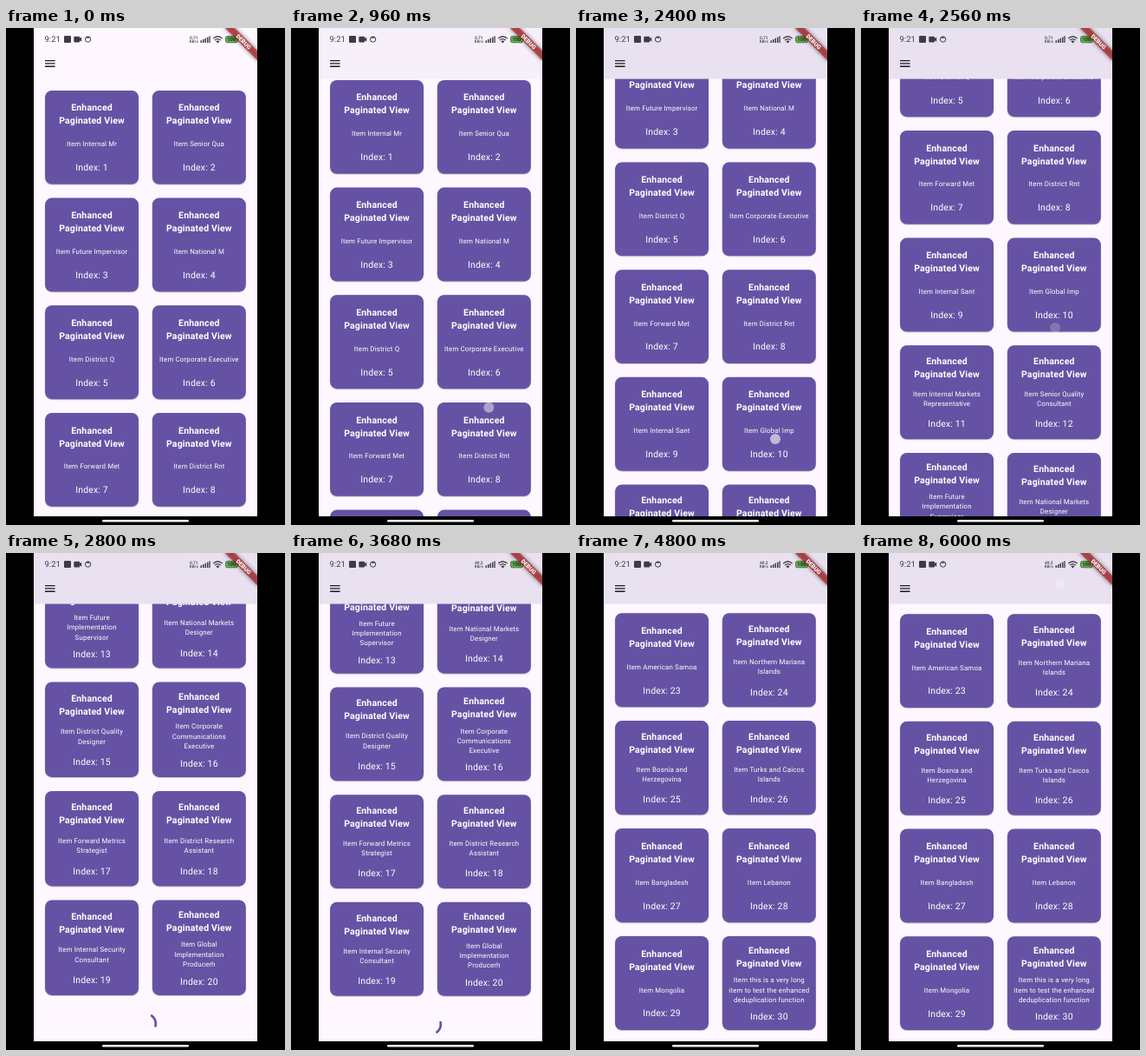
These frames come from a looping animation (322 px wide and 572 px high, 6240 ms). An HTML page:

```html
<!DOCTYPE html>
<html lang="en">
<head>
<meta charset="utf-8">
<title>Paginated list</title>
<style>
html, body { margin: 0; width: 100%; height: 100%; overflow: hidden; background: #000; }
svg { display: block; width: 100vw; height: 100vh; font-family: Roboto, sans-serif; }
.card text { fill: #fff; text-anchor: middle; letter-spacing: .164px; }
.big { font-size: 10.5px; }
.small { font-size: 7.87px; }
.bold { font-weight: 700; }
</style>
</head>
<body>
<svg viewBox="0 0 322 572" text-rendering="geometricPrecision">
  <defs>
    <clipPath id="screen"><rect x="32" width="258" height="562"/></clipPath>
    <filter id="soft" x="-20%" y="-150%" width="140%" height="400%"><feGaussianBlur stdDeviation="2.4"/></filter>
  </defs>
  <rect width="322" height="572"/>
  <g clip-path="url(#screen)">
    <rect x="32" width="258" height="562" fill="#fef7ff"/>
    <g id="list"><path id="spinner" fill="none" stroke="#6750a4" stroke-width="2.63" stroke-linecap="square"/></g>
    <rect id="bar" x="32" width="258" height="58.6"/>
    <g fill="#1d1b20"><path d="M45 37h11.6v1.3h-11.6zM45 40.3h11.6v1.3h-11.6zM45 43.6h11.6v1.3h-11.6z"/></g>
    <g fill="#3f3b44">
      <text x="44.5" y="16.3" font-size="9.4" letter-spacing=".1">9:21</text>
      <rect x="67" y="9" width="8" height="8" rx="1"/>
      <path d="M79.3 9.8h4.8q1 0 1 1v1.2l2.1-1.5v5.2l-2.1-1.5v1.2q0 1-1 1h-4.8q-1 0-1-1v-4.6q0-1 1-1z"/>
      <circle cx="94.6" cy="13" r="3.2" fill="none" stroke="#3f3b44"/>
      <path d="M92.8 10.2h3.6v1.5h-3.6z"/>
      <g font-size="4.9" font-weight="500" text-anchor="middle">
        <text id="speed" x="216.8" y="12.6"></text>
        <text x="216.8" y="17.4" font-size="4.6">KB/s</text>
      </g>
      <path d="M224.5 14.2h1.5v2.8h-1.5zM227 13h1.5v4h-1.5zM229.5 11.7h1.5v5.3h-1.5zM232 10.4h1.5v6.6h-1.5zM234.4 9.2h1.3v7.8h-1.3z"/>
      <g fill="none" stroke="#3f3b44" stroke-width="1.3">
        <path d="M239.2 12.1q5.2-4.8 10.4 0M241 14.1q3.4-3 6.8 0"/>
      </g>
      <path d="M242.3 15.3q2.1-1.7 4.2 0l-2.1 2.2z"/>
    </g>
    <rect x="253.5" y="9.4" width="14" height="7.4" rx="2" fill="#58b947" stroke="#4b514a" stroke-width=".8"/>
    <rect x="268.1" y="11.6" width="1.2" height="3" fill="#4b514a"/>
    <text x="260.3" y="15.3" font-size="6" font-weight="700" text-anchor="middle" fill="#243323">100</text>
    <g transform="translate(290 0) rotate(45)">
      <rect x="-27" y="18.4" width="54" height="7.9" opacity=".5" filter="url(#soft)"/>
      <rect x="-27" y="18.4" width="54" height="7.9" fill="#b71c1c" opacity=".63"/>
      <text y="24.7" font-size="6.7" font-weight="900" text-anchor="middle" fill="#fff">DEBUG</text>
    </g>
    <circle id="touch" r="6" fill="#fff"/>
  </g>
  <rect x="111" y="566" width="100" height="2.4" rx="1.2" fill="#f4f4f4"/>
</svg>
<script>
const LOOP = 6240, STEP = 80, LAST = 6000;
const TOP = 71.9, PITCH = 123.68, CARD = 107.9, BOTTOM = 562;
const PAGE = 164.8, PAGE2 = PAGE + 5 * PITCH, END = 1362.2;
const NS = 'http://www.w3.org/2000/svg';
const $ = id => document.getElementById(id);
const list = $('list'), spinner = $('spinner'), bar = $('bar'), touch = $('touch'), speed = $('speed');

const names = [
  'Internal Mr', 'Senior Qua', 'Future Impervisor', 'National M', 'District Q',
  'Corporate Executive', 'Forward Met', 'District Rnt', 'Internal Sant', 'Global Imp',
  'Internal Markets|Representative', 'Senior Quality|Consultant',
  'Future|Implementation|Supervisor', 'National Markets|Designer',
  'District Quality|Designer', 'Corporate|Communications|Executive',
  'Forward Metrics|Strategist', 'District Research|Assistant',
  'Internal Security|Consultant', 'Global|Implementation|Producerh',
  'Virgin Islands, U.S.', 'French Southern|Territories', 'American Samoa',
  'Northern Mariana|Islands', 'Bosnia and|Herzegovina', 'Turks and Caicos|Islands',
  'Bangladesh', 'Lebanon', 'Mongolia',
  'this is a very long|item to test the enhanced|deduplication function'
];

function add(parent, tag, attrs, text) {
  const el = document.createElementNS(NS, tag);
  for (const k in attrs) el.setAttribute(k, attrs[k]);
  if (text) el.textContent = text;
  return parent.appendChild(el);
}

// Three blocks (title, name, index) share the free height evenly.
function makeCard(name, i) {
  const x = i % 2 ? 168.9 : 45.1, y = TOP + PITCH * (i >> 1);
  const g = add(list, 'g', { class: 'card', transform: `translate(${x} ${y})` });
  add(g, 'rect', { x: -.3, y: .3, width: CARD + .6, height: CARD + .7, rx: 8.2, opacity: .2 });
  add(g, 'rect', { width: CARD, height: CARD, rx: 7.9, fill: '#6652a4' });
  const lines = ('Item ' + name).split('|');
  const gap = (CARD - 10.5 - 45 - 11.25 * lines.length) / 3;
  let top = 5.25 + gap / 2;
  const put = (text, cls, base, height) => {
    add(g, 'text', { x: CARD / 2, y: top + base, class: cls }, text);
    top += height;
  };
  put('Enhanced', 'big bold', 11.5, 15);
  put('Paginated View', 'big bold', 11.5, 15);
  top += gap;
  lines.forEach(line => put(line, 'small', 8.6, 11.25));
  top += gap;
  put('Index: ' + (i + 1), 'big', 11.5, 15);
  return g;
}
const cards = names.map(makeCard);

// Linear track through [time, value] points.
function track(points, t) {
  if (t <= points[0][0]) return points[0][1];
  for (let i = 1; i < points.length; i++) {
    const [a, u] = points[i - 1], [b, v] = points[i];
    if (t <= b) return u + (v - u) * (t - a) / (b - a);
  }
  return points[points.length - 1][1];
}

const scrollTrack = [
  [880, 0], [960, 12], [1040, 62], [1120, 128], [1200, PAGE],
  [2400, PAGE], [2480, 195], [2560, 325], [2640, 510], [2720, 710], [2800, PAGE2],
  [4240, PAGE2], [4320, 913], [4400, 1141.5], [4480, 1303], [4560, END]
];
const stretchTrack = [
  [1120, 0], [1200, .006], [1280, .008], [1360, .0017], [1520, 0],
  [2720, 0], [2800, .0147], [2880, .007], [2960, .002], [3040, 0],
  [4480, 0], [4560, .012], [4640, .01], [4720, .005], [4800, .002], [4960, 0]
];
// start, end, from x y, to x y, opacity from, to
const touches = [
  [880, 1120, 230, 480, 225, 350, .6, .2],
  [2400, 2560, 230, 473, 224, 345, .6, .2],
  [4240, 4400, 230, 473, 224, 362, .6, .22],
  [5840, 6000, 229, 4, 230, 36, .4, .25]
];

// Cubic bezier (.4, 0, .2, 1)
function ease(x) {
  let lo = 0, hi = 1, s = .5;
  for (let i = 0; i < 20; i++) {
    s = (lo + hi) / 2;
    const bx = 3 * s * (1 - s) * (1 - s) * .4 + 3 * s * s * (1 - s) * .2 + s * s * s;
    if (bx < x) lo = s; else hi = s;
  }
  return s * s * (3 - 2 * s);
}
const clamp = v => Math.min(1, Math.max(0, v));

function arc(ms, cy) {
  const phase = ms / 1333 % 1, r = 11.8;
  const head = ease(clamp(phase * 2)), tail = ease(clamp(phase * 2 - 1));
  const from = Math.PI * (-.5 + 1.5 * tail + 2 * (ms / 2222 % 1) + .5 * phase);
  const sweep = Math.max(1.5 * Math.PI * (head - tail), .001);
  const at = a => `${161 + r * Math.cos(a)} ${cy + r * Math.sin(a)}`;
  return `M${at(from)}A${r} ${r} 0 ${sweep > Math.PI ? 1 : 0} 1 ${at(from + sweep)}`;
}

function draw(t) {
  const count = t < 2000 ? 10 : t < 3760 ? 20 : 30;
  cards.forEach((c, i) => c.style.display = i < count ? '' : 'none');

  const scroll = track(scrollTrack, t), k = 1 + track(stretchTrack, t);
  list.setAttribute('transform', `matrix(1 0 0 ${k} 0 ${BOTTOM - k * (BOTTOM + scroll)})`);

  spinner.style.display = count < 30 ? '' : 'none';
  const born = count === 10 ? 880 : 2626;
  const cy = TOP + PITCH * (count / 2 - 1) + CARD + 32.6;
  spinner.setAttribute('d', arc(Math.max(0, t - born) * .95, cy));

  const tint = clamp((t - 880) / 240);
  const mix = (a, b) => Math.round(a + (b - a) * tint);
  bar.setAttribute('fill', `rgb(${mix(254, 233)},${mix(247, 225)},${mix(255, 240)})`);
  speed.textContent = t < 3200 ? '0.71' : '49.2';

  const hit = touches.find(p => t >= p[0] && t <= p[1]);
  touch.style.display = hit ? '' : 'none';
  if (hit) {
    const [a, b, x, y, x2, y2, o, o2] = hit, f = (t - a) / (b - a);
    touch.setAttribute('cx', x + (x2 - x) * f);
    touch.setAttribute('cy', y + (y2 - y) * f);
    touch.setAttribute('opacity', o + (o2 - o) * f);
  }
}

const start = performance.now();
function tick() {
  const t = (performance.now() - start) % LOOP;
  draw(Math.min(LAST, Math.floor(t / STEP) * STEP));
  requestAnimationFrame(tick);
}
tick();
</script>
</body>
</html>
```
